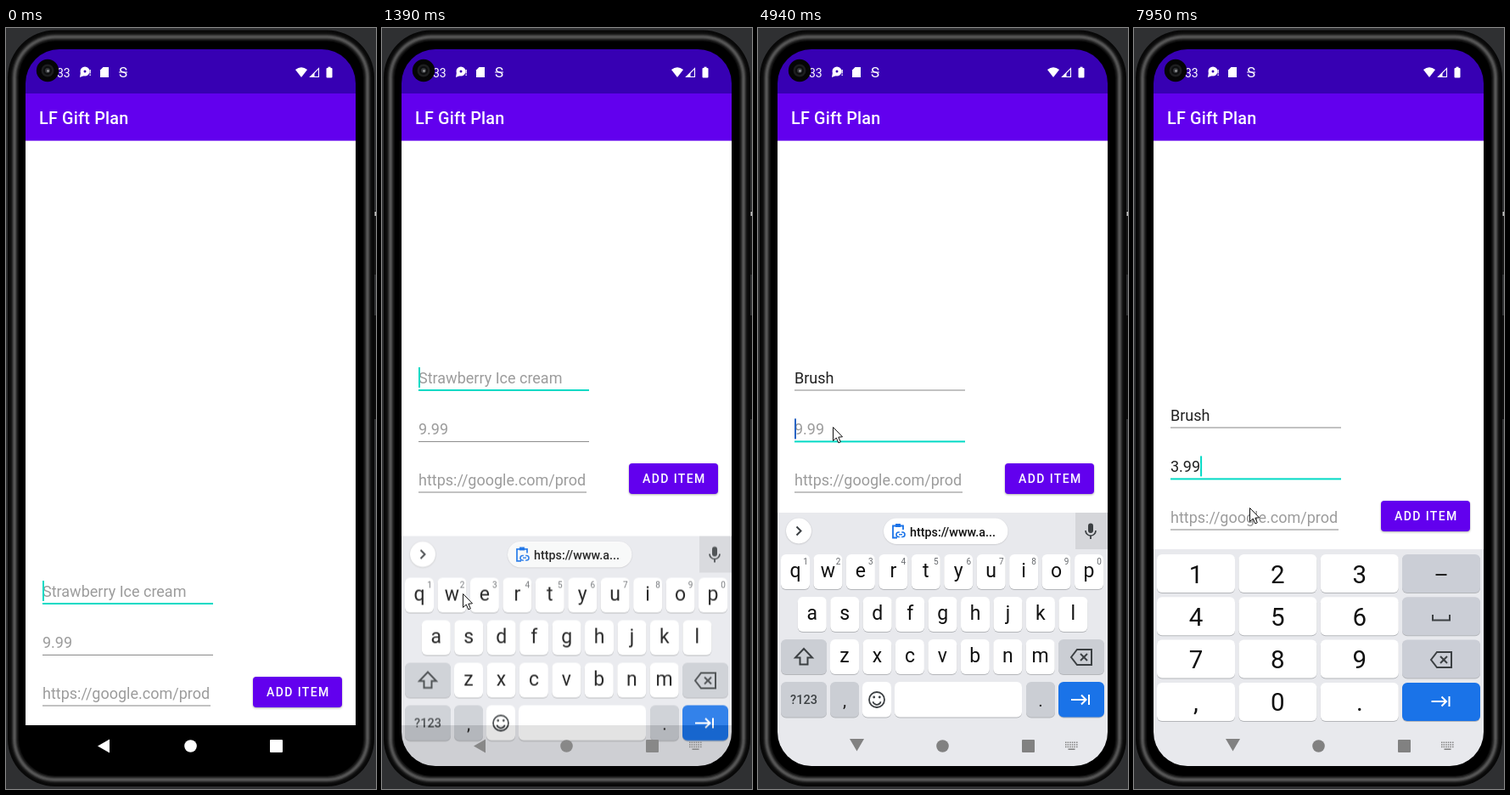
Write an HTML page with a canvas that moves like this. It is 436 by 895 pixels and loops after 8 s.

```html
<!DOCTYPE html>
<html lang="en">
<head>
<meta charset="utf-8">
<title>Gift list</title>
<style>
html, body { margin: 0; width: 100%; height: 100%; overflow: hidden; background: #2f3032; }
canvas { display: block; width: 436px; height: 895px; }
</style>
</head>
<body>
<canvas id="stage"></canvas>
<script>
const W = 436, H = 895, LOOP = 8000;
const TEAL = '#03dac5', PANEL = '#e8e9ed', SPECIAL = '#cbced4', BLUE = '#1a73e8', INK = '#3c4043';
const FIELD_SIZE = 18;
const dpr = window.devicePixelRatio || 1;

function context(canvas) {
  canvas.width = W * dpr;
  canvas.height = H * dpr;
  const c = canvas.getContext('2d');
  c.scale(dpr, dpr);
  return c;
}
const main = context(document.getElementById('stage'));
let g = main;

// drawing helpers
function rect(x, y, w, h, color) { g.fillStyle = color; g.fillRect(x, y, w, h); }
function round(x, y, w, h, r, color) {
  g.beginPath(); g.roundRect(x, y, w, h, r);
  g.fillStyle = color; g.fill();
}
function disc(x, y, r, color) {
  g.beginPath(); g.arc(x, y, r, 0, 7);
  g.fillStyle = color; g.fill();
}
function poly(points, color) {
  g.beginPath();
  points.forEach(([x, y]) => g.lineTo(x, y));
  g.closePath();
  g.fillStyle = color; g.fill();
}
function line(points, color, width, close) {
  g.beginPath();
  points.forEach(([x, y]) => g.lineTo(x, y));
  if (close) g.closePath();
  g.strokeStyle = color; g.lineWidth = width; g.stroke();
}
function shadow(color, blur, dy) {
  g.shadowColor = color; g.shadowBlur = blur * dpr; g.shadowOffsetY = dy * dpr;
}
function text(s, x, y, size, color, weight = 400, align = 'left', spacing = 0) {
  g.font = `${weight} ${size}px Roboto, sans-serif`;
  g.letterSpacing = spacing + 'px';
  g.textAlign = align;
  g.fillStyle = color;
  g.fillText(s, x, y);
}

// timing helpers
const passed = (t, times) => times.filter(at => t >= at).length;
const clamp = v => Math.max(0, Math.min(1, v));
const smooth = v => { v = clamp(v); return v * v * (3 - 2 * v); };
const gray = v => `rgb(${v},${v},${v})`;
// time held at n even steps between two moments
function held(t, from, to, n) {
  const gap = (to - from) / (n - 1);
  return t < from ? t : Math.min(to, from + Math.floor((t - from) / gap + 0.05) * gap);
}

function phoneBody() {
  rect(0, 0, W, H, '#2f3032');
  rect(433, 215, 3, 75, '#161616');
  rect(434.5, 216, 1.5, 5, '#c8c8c8');
  rect(433, 338, 3, 122, '#0c0c0c');
  // glossy rim: thin dark edge, then a soft highlight
  for (let d = 2; d <= 15; d++) {
    const shine = Math.exp(-(((d - 9.5) / 2.8) ** 2));
    round(d, d + 0.5, W - 2 * d, H - 1.5 - 2 * d, 58 - d, gray(Math.round(8 + 80 * shine)));
  }
  round(15, 15.5, 406, 864, 44, '#000');
}

function statusBar() {
  rect(23, 25, 389, 52.5, '#3700b3');
  text('33', 60, 57.5, 14, '#fff');
  disc(93, 51, 5.5, '#fff');
  poly([[88, 52], [92, 56], [87, 58]], '#fff');
  disc(93, 51, 1.5, '#3700b3');
  rect(98.5, 49, 1.3, 4.5, '#fff');
  rect(98.5, 54.5, 1.3, 1.5, '#fff');
  poly([[114.5, 46], [121, 46], [121, 58], [111, 58], [111, 49.5]], '#fff');
  text('S', 138, 58, 17, '#fff', 400, 'center');
  line([[133, 52], [143, 52]], '#fff', 1.2);
  g.beginPath();
  g.moveTo(348, 58); g.lineTo(341, 49); g.quadraticCurveTo(348, 43.5, 355, 49);
  g.fillStyle = '#fff'; g.fill();
  line([[368.5, 47.5], [368.5, 57.5], [358.5, 57.5]], '#fff', 1.1, true);
  poly([[363.5, 52.5], [363.5, 58], [358, 58]], '#fff');
  round(377.5, 47, 7, 11.5, 1, '#fff');
  rect(379.5, 45.7, 3, 2, '#fff');
}

function camera() {
  disc(49, 50, 13.2, '#050505');
  disc(49, 50, 7.5, '#1d1e1f');
  disc(49, 50, 5, '#0d0e0f');
  disc(49, 50, 3, '#35373a');
  disc(49.5, 50.5, 1.4, '#909294');
}

function field(value, hint, top, width, focus) {
  text(value || hint, 43, top + 19, FIELD_SIZE, value ? '#212121' : '#9c9c9c');
  const end = 43 + (value ? g.measureText(value).width : 0);
  if (focus) {
    rect(43, top + 26, width, 2, TEAL);
    if (focus.caret) rect(end, top, 2, 24, focus.color);
  } else {
    rect(43, top + 26.5, width, 1, '#858585');
  }
}

function form(t) {
  const lift = t < 1180 ? 0 : t < 5350 ? 251 : 207;
  const name = 'Brush'.slice(0, passed(t, [2190, 3190, 3320, 3450, 3590]));
  const price = '3.99'.slice(0, passed(t, [6210, 6350, 6810, 6940]));
  const blinks = [330, 680, 1460, 1930, 2920, 3190, 4180, 4800, 5750, 6210, 7410, 7880];
  const onPrice = t >= 4800;
  const focus = {
    caret: passed(t, blinks) % 2 === 0,
    color: onPrice && t < 5350 ? '#2864c4' : TEAL
  };
  g.save();
  g.translate(0, -lift);
  field(name, 'Strawberry Ice cream', 650, 201, !onPrice && focus);
  const marked = passed(t, [2460, 3320, 3450, 3590, 3850]);
  if (marked && !onPrice) {
    g.font = `400 ${FIELD_SIZE}px Roboto, sans-serif`;
    rect(43, 670, g.measureText(name.slice(0, marked)).width, 1, '#212121');
  }
  field(price, '9.99', 710.4, 201, onPrice && focus);
  field('', 'https://google.com/prod', 770, 198);
  g.save();
  shadow('rgba(0,0,0,.32)', 2.5, 1);
  round(291, 763, 105, 36, 4, '#6200ee');
  g.restore();
  text('ADD ITEM', 307, 786, 14, '#fff', 500, 'left', 1.4);
  g.restore();
}

function key(x, y, w, h, color = '#fff') {
  round(x, y + 1, w, h, 6, '#b4b6ba');
  round(x, y, w, h, 6, color);
}

function backspace(x, y) {
  line([[x - 12, y], [x - 5, y - 9], [x + 12, y - 9], [x + 12, y + 9], [x - 5, y + 9]], INK, 2, true);
  line([[x - 1, y - 4], [x + 7, y + 4]], INK, 2);
  line([[x - 1, y + 4], [x + 7, y - 4]], INK, 2);
}

function nextIcon(x, y) {
  line([[x - 11, y], [x + 6, y]], '#fff', 2);
  line([[x + 1, y - 5.5], [x + 6.5, y], [x + 1, y + 5.5]], '#fff', 2);
  line([[x + 10, y - 6], [x + 10, y + 6]], '#fff', 2);
}

function letterKeys(letters, x, y) {
  [...letters].forEach((ch, i) => {
    const left = x + i * 38.45;
    key(left, y, 34, 41);
    text(ch, left + 17, y + 27.3, 23, '#111', 400, 'center');
  });
}

function letterBoard() {
  rect(23, 570, 389, 300, PANEL);
  g.save();
  shadow('rgba(0,0,0,.2)', 2, 0.5);
  disc(48, 591.5, 15, '#fff');
  g.restore();
  line([[45.5, 586.5], [50.5, 591.5], [45.5, 596.5]], INK, 2);
  rect(374, 570, 38, 43, '#d5d6da');
  round(389, 582.5, 6, 11.5, 3, INK);
  g.beginPath(); g.arc(392, 591, 6, 0, Math.PI);
  g.strokeStyle = INK; g.lineWidth = 1.7; g.stroke();
  rect(391.1, 597, 1.8, 4, INK);

  letterKeys('qwertyuiop', 27, 619);
  for (let i = 0; i < 10; i++) text((i + 1) % 10, 56 + i * 38.45, 630.5, 10, '#66696d', 400, 'center');
  letterKeys('asdfghjkl', 46.8, 669);
  letterKeys('zxcvbnm', 85, 719);
  key(27, 719, 54, 41, SPECIAL);
  line([[54, 730], [64, 740.5], [58.5, 740.5], [58.5, 748.5], [49.5, 748.5], [49.5, 740.5], [44, 740.5]], INK, 2, true);
  key(354, 719, 54, 41, SPECIAL);
  backspace(381, 740);

  key(27, 769, 54, 41.5, SPECIAL);
  text('?123', 54, 795, 14.5, INK, 500, 'center');
  key(85, 769, 34, 41.5, SPECIAL);
  text(',', 102, 798, 21, '#222', 400, 'center');
  key(123, 769, 34, 41.5);
  g.strokeStyle = INK; g.lineWidth = 1.8;
  g.beginPath(); g.arc(140, 790, 9, 0, 7); g.stroke();
  g.beginPath(); g.arc(140, 791, 4.8, 0.25, Math.PI - 0.25); g.stroke();
  disc(136.7, 787, 1.4, INK);
  disc(143.3, 787, 1.4, INK);
  key(161, 769, 150, 41.5);
  key(316, 769, 34, 41.5, SPECIAL);
  text('.', 333, 798, 21, '#222', 400, 'center');
  key(354, 769, 54, 41.5, BLUE);
  nextIcon(380, 790);
}

function numberBoard() {
  rect(23, 613, 389, 257, PANEL);
  ['123', '456', '789', ',0.'].forEach((row, r) => {
    const y = 619 + r * 50.3;
    [...row].forEach((ch, i) => {
      const x = 27 + i * 96.4;
      key(x, y, 92, 45);
      text(ch, x + 46, y + 33.5, 29.5, '#111', 400, 'center');
    });
    key(316, y, 92, 45, r === 3 ? BLUE : '#cbced6');
  });
  rect(355.5, 642, 13, 2, '#222');
  line([[352, 690], [352, 696.5], [372, 696.5], [372, 690]], INK, 2);
  backspace(362, 743);
  nextIcon(361.5, 792);
}

function pasteChip() {
  g.save();
  shadow('rgba(0,0,0,.18)', 1.5, 0.5);
  round(148, 576.5, 146.5, 30.5, 15.2, '#fff');
  g.restore();
  line([[164, 599.5], [159, 599.5], [159, 585.5], [171, 585.5], [171, 590]], BLUE, 1.8);
  rect(162, 583, 6, 4, BLUE);
  g.strokeStyle = BLUE; g.lineWidth = 1.6;
  g.beginPath(); g.roundRect(163, 593, 10, 5.5, 2.7); g.stroke();
  rect(166.8, 592, 2.4, 2.5, '#fff');
  rect(166.8, 597, 2.4, 2.5, '#fff');
  rect(166, 595, 4, 1.4, BLUE);
  text('https://www.a...', 179, 597.5, 14.3, '#111', 500);
}

function layer(draw) {
  const canvas = document.createElement('canvas');
  g = context(canvas);
  draw();
  g = main;
  return canvas;
}
const letters = layer(letterBoard);
const numbers = layer(numberBoard);

function keyboard(t, shown) {
  if (t >= 5006) {
    g.drawImage(numbers, 0, 0, W, H);
  } else if (shown > 0) {
    g.save();
    g.translate(0, 251 * (1 - shown));
    g.globalAlpha = shown;
    g.drawImage(letters, 0, 0, W, H);
    if (t >= 1390) pasteChip();
    g.restore();
  }
}

function navIcons(t, shown) {
  const color = gray(Math.round(255 - 126 * Math.sqrt(shown)));
  poly(t < 1530 ? [[108, 844.5], [122, 836.5], [122, 852.5]] : [[108, 836], [125, 836], [116.5, 850.5]], color);
  disc(217.5, 844.5, 7.3, color);
  round(311, 837, 15, 15, 1, color);
  if (shown > 0) {
    for (let r = 0; r < 3; r++)
      for (let i = 0; i < 6; i++) rect(362 + i * 2.6, 839.5 + r * 2.6, 1.5, 1.5, color);
    rect(365.5, 847.5, 8, 1.5, color);
  }
}

function pointerAt(t) {
  if (t < 330) return null;
  if (t < 400) return [314, 855];
  if (t < 470) return [168, 712];
  if (t < 4180) return [96, 665];
  if (t < 7410) {
    const p = smooth((held(t, 4180, 4540, 6) - 4110) / 430), q = 1 - p;
    return [q * q * 96 + 2 * p * q * 232 + p * p * 89, 665 - 196 * p];
  }
  const p = smooth((held(t, 7410, 7950, 8) - 7410) / 540);
  return [89 + 48 * p + 8 * p * (1 - p), 469 + 95 * p];
}

function pointer([x, y]) {
  const shape = [[0, 0], [0, 16], [3.8, 12.6], [6.4, 18.4], [8.8, 17.3], [6.3, 11.7], [11, 11.3]]
    .map(([dx, dy]) => [x - 0.5 + dx, y + 0.5 + dy]);
  poly(shape, '#fff');
  line(shape, '#111', 1, true);
}

function draw(t) {
  const shown = smooth((held(t, 680, 1460, 12) - 1115) / 345);
  phoneBody();
  g.save();
  g.beginPath(); g.roundRect(23, 25, 389, 843, 40); g.clip();
  rect(23, 25, 389, 843, '#000');
  rect(23, 132, 389, 688, '#fff');
  statusBar();
  rect(23, 77, 389, 55.6, '#6200ee');
  text('LF Gift Plan', 39, 112.8, 19.8, '#fff', 500, 'left', 0.2);
  form(t);
  keyboard(t, shown);
  navIcons(t, shown);
  g.restore();
  camera();
  const at = pointerAt(t);
  if (at) pointer(at);
}

const start = performance.now();
function tick() {
  draw((performance.now() - start) % LOOP);
  requestAnimationFrame(tick);
}
tick();
</script>
</body>
</html>
```
